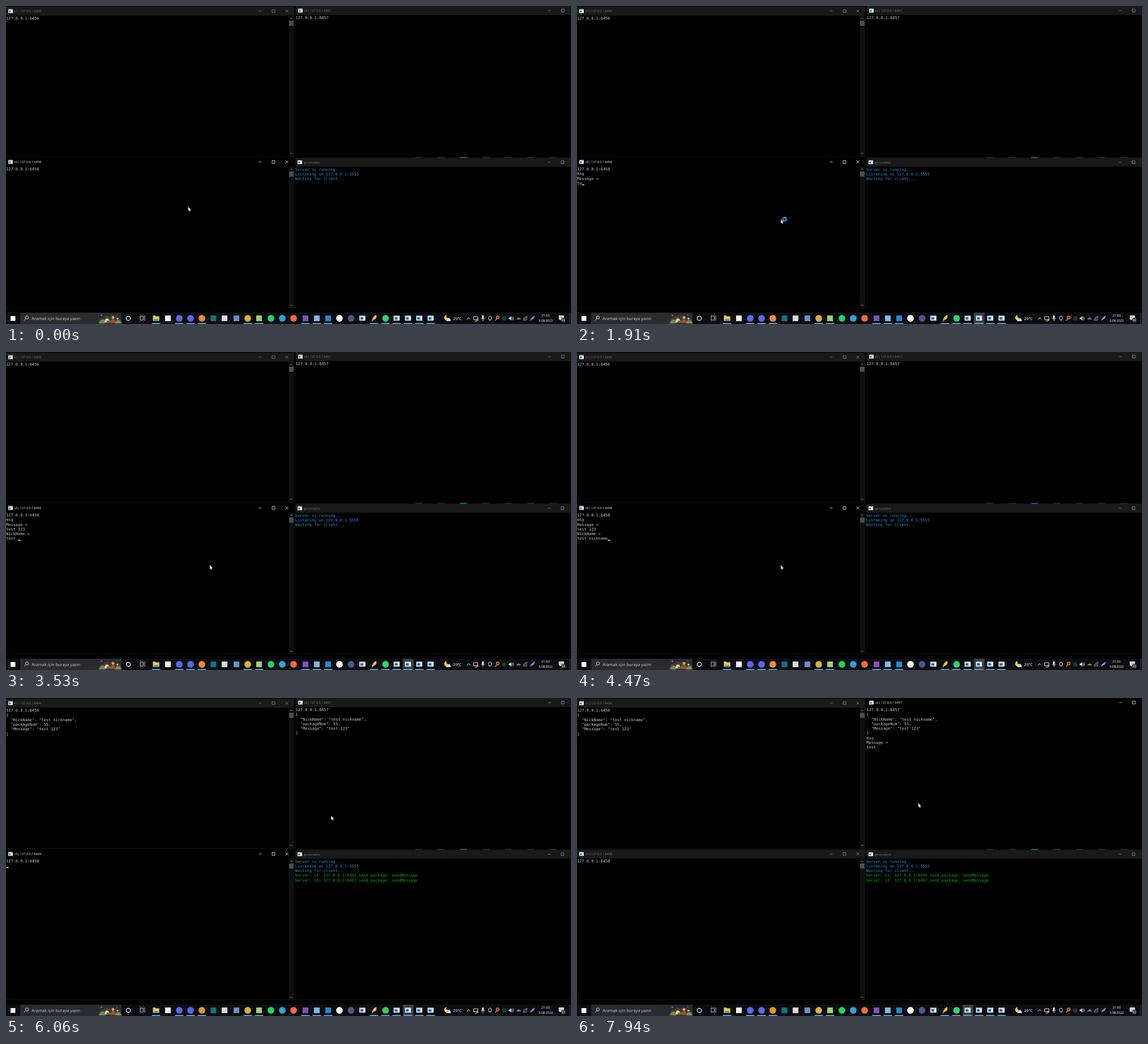
An HTML page that plays this animation: 998x561 px, repeating every 8000 ms.

```html
<!DOCTYPE html>
<html lang="tr">
<head>
<meta charset="utf-8">
<title>Terminals</title>
<style>
html, body { margin: 0; width: 100%; height: 100%; overflow: hidden; background: #000; }
svg { display: block; width: 100%; height: 100%; }
text { white-space: pre; text-rendering: geometricPrecision; }
.mono { font: 6.915px "DejaVu Sans Mono", "Liberation Mono", monospace; }
.ui { font-family: "Open Sans", "Noto Sans", sans-serif; fill: #fff; }
</style>
</head>
<body>
<svg id="stage" viewBox="0 0 998 561" preserveAspectRatio="none"></svg>
<script>
const LOOP = 8000, CHAR = 4.163, LINE = 8.31, SENT = 4680, SWITCH = 6300;
const stage = document.getElementById('stage');

function add(tag, attrs, parent = stage, text = '') {
  const el = document.createElementNS('http://www.w3.org/2000/svg', tag);
  for (const key in attrs) el.setAttribute(key, attrs[key]);
  el.textContent = text;
  parent.appendChild(el);
  return el;
}
const rect = (x, y, width, height, fill, parent) => add('rect', { x, y, width, height, fill }, parent);
const disc = (cx, cy, r, fill, parent) => add('circle', { cx, cy, r, fill }, parent);
const ring = (cx, cy, r, stroke, width, parent) =>
  add('circle', { cx, cy, r, stroke, fill: 'none', 'stroke-width': width }, parent);
const shape = (d, fill, parent) => add('path', { d, fill }, parent);
const line = (d, stroke, width = 1, parent) =>
  add('path', { d, stroke, fill: 'none', 'stroke-width': width }, parent);
const label = (x, y, text, size, parent) =>
  add('text', { x, y, class: 'ui', style: `font-size:${size}px` }, parent, text);
const show = (el, on) => el.setAttribute('visibility', on ? 'visible' : 'hidden');

function consoleIcon(x, y, w, h) {
  rect(x, y, w, h, '#e8eef0');
  rect(x, y, w, 1.2, '#9fb4bc');
  rect(x + w * .15, y + h * .36, w * .4, h * .42, '#2a7f86');
}

// Title bar; buttons is the centre of the minimise sign. Returns its painter.
function titleBar(x, y, w, title, buttons, hasClose) {
  const back = rect(x, y, w, 16, '#191919');
  const mid = y + 8;
  consoleIcon(x + 4, mid - 3.3, 8, 6.8);
  const name = label(x + 15, mid + 2.1, title, 5.45);
  let d = `M${buttons - 2.5} ${mid}h5M${buttons + 21} ${mid - 2.5}h5v5h-5z`;
  if (hasClose) d += `M${buttons + 44.5} ${mid - 2.5}l5 5m0 -5l-5 5`;
  const signs = line(d, '#fff', .75);
  return active => {
    back.setAttribute('fill', active ? '#000' : '#191919');
    name.style.fill = active ? '#fff' : '#808080';
    signs.setAttribute('stroke', active ? '#fff' : '#8a8a8a');
  };
}

function scrollbar(top, bottom) {
  rect(499.5, top, 8.5, bottom - top, '#101010');
  rect(500, top + 9, 7.8, 9, '#4d4d4d');
  line(`M502 ${top + 6}l1.8 -1.8l1.8 1.8M502 ${bottom - 6}l1.8 1.8l1.8 -1.8`, '#999', .9);
}

// Text area that accepts a string and optionally places a cursor after it.
function terminal(x, y) {
  const rows = [];
  const caret = rect(0, 0, CHAR + .2, 1.6, '#ddd');
  return (text, caretOn = false, color = () => '#ccc') => {
    const parts = text.split('\n');
    while (rows.length < parts.length)
      rows.push(add('text', { x, y: y + rows.length * LINE, class: 'mono' }));
    rows.forEach((row, i) => {
      const value = parts[i] || '';
      if (row.textContent !== value) row.textContent = value;
      row.style.fill = color(i);
    });
    const last = parts.length - 1;
    caret.setAttribute('x', x + parts[last].length * CHAR);
    caret.setAttribute('y', y + last * LINE - .2);
    show(caret, caretOn);
  };
}

// Windows
const paintTitle1 = titleBar(0, 1, 508, 's1| 127.0.0.1:6456', 449, true);
const paintTitle2 = titleBar(512, 0, 486, 's2| 127.0.0.1:6457', 960, false);
const paintTitle3 = titleBar(0, 267, 508, 's3| 127.0.0.1:6458', 449, true);
const paintTitle4 = titleBar(511, 267.5, 487, 'go-socketio', 959.5, false);
scrollbar(17, 265);
scrollbar(283, 533);
line('M0 265.5H508.5M508.5 0V533M511.5 0V533M0 532.5H998', '#131510', .8);
for (let i = 0; i < 7; i++)
  rect(723 + i * 39.5, 266.5, 12.5, 1.2, i === 2 ? '#2798c4' : '#2d4048');

const write1 = terminal(.2, 24), write2 = terminal(511.6, 22.9);
const write3 = terminal(.2, 289.9), write4 = terminal(510.8, 290.5);

// Taskbar
rect(0, 541, 998, 20, '#0b0d12');
rect(25, 541, 179, 20, '#292b30');
rect(8, 547, 8.5, 8.5, '#fff');
ring(37, 549.5, 2.7, '#ddd', .9);
line('M35 551.5l-3 3.2', '#ddd', .9);
label(45.3, 553.7, 'Aramak için buraya yazın', 7.4).style.fill = '#d0d0d0';

// Search illustration
shape('M163 560q1 -11 8 -10q4 -5 10 -2q7 -5 13 0q9 0 10 12z', '#37402a');
shape('M164 560q2 -7 7 -7q4 0 5 7z', '#6f8d4c');
shape('M192 560q2 -6 6 -6q5 0 6 6z', '#7a8f4f');
shape('M174 558q1 -7 4 -7q4 0 5 7z', '#e3d6c2');
shape('M185 559q1 -7 4 -7q4 0 5 7z', '#b0453a');
rect(178, 555, 11, 3.5, '#8a5a36');
disc(178.5, 549, 2.4, '#6b3426');
disc(189, 549.5, 2.4, '#d8a077');
disc(197, 551.5, 1.6, '#e8d9c0');
disc(168.5, 545.5, 1.3, '#c65be0');
disc(196, 545, .9, '#d05a60');

const focus = rect(701, 541, 19, 20, '#3a3e44');
ring(216, 551, 3.7, '#fff', 1.2);
line('M237 547h5.5v7h-5.5zM245 546v9M237 545v-.8M242.5 545v-.8M237 557v-.8M242.5 557v-.8', '#ddd', .9);
shape('M259.5 546h4l1.2 1.5h6v8h-11.2z', '#f4c64e');
rect(261.5, 552, 7.5, 3.6, '#3d9adb');

// Plain app marks: [centre, colour, square]
[
  [286, '#f2f2f2', 1], [306, '#5a68e8'], [326, '#5a68e8'], [346, '#ef8b32'],
  [366.5, '#0d7580', 1], [386, '#d5d9dc', 1], [407, '#6c8ec4', 1], [427, '#d8b13c'],
  [447, '#a5cc75', 1], [468, '#1ed760'], [488, '#2aa5dc'], [508, '#f76935'],
  [529, '#8052b9', 1], [549, '#86b7da', 1], [569, '#2489ca', 1], [589, '#f3f5f2'],
  [609.5, '#4e5688'], [670.5, '#2bd366']
].forEach(([x, color, square]) =>
  square ? rect(x - 5, 546, 10, 10, color) : disc(x, 551, 5.9, color));

shape('M646 556q1 -8 8 -11q2 5 -3 8z', '#e8c64c');
line('M646 557l4 -6', '#d9822b', .9);
[629.5, 690, 710, 730, 750].forEach(x => {
  rect(x - 5.3, 546.5, 10.6, 8.5, '#edf3f6');
  rect(x - 5.3, 546.5, 10.6, 1.5, '#b3cbd9');
  rect(x - 3.5, 549, 5, 4.3, '#1d67a8');
});
[265, 306, 326, 346, 427, 447, 529, 549, 569, 650, 670, 690, 710, 730, 750]
  .forEach(x => rect(x - 7.5, 559.3, 15, 1.7, '#68acd9'));

// Tray
disc(779, 550, 5, '#f3c64a');
disc(781.5, 547, 3.7, '#0b0d12');
shape('M778 556q-1 -3 2 -3q1 -2.5 3.5 -1.5q2.5 .5 2 4.5z', '#d7e0e8');
label(789.7, 553.5, '29°C', 6.9);
line('M814.5 552.5l2.8 -2.8l2.8 2.8', '#eee', 1);
line('M826 548h7.5v5.5h-7.5zM828 556h4', '#ddd', 1);
disc(832.5, 553.5, 2, '#e7953f');
rect(841, 546, 2.8, 6, '#eee');
line('M839.5 550q0 3.5 3 3.5q3 0 3 -3.5M842.5 553.5v2.5', '#ddd', .7);
line('M852.5 548h5v5h-5zM855 546v2M855 553v3', '#ccc', .9);
ring(868.5, 549.5, 2.4, '#ef7932', 1.5);
line('M867 551.5l-3 3.5', '#ef7932', 1.5);
disc(880, 551, 3.8, '#143f31');
shape('M888 549.5h2l2.5 -2.5v8l-2.5 -2.5h-2z', '#ddd');
line('M893.5 549q1.5 2 0 4M895 547.5q2.8 3.5 0 7', '#ddd', .8);
shape('M901.5 553q0 -2.5 2 -2.5q3 -2.5 4.5 .5q1.5 0 1.5 2z', '#777');
line('M914 555q0 -7 7 -7.5M916 555q0 -5 5 -5.5M918.3 555q0 -2.5 2.7 -3', '#bbb', .9);
shape('M926 556q0 -6 8 -10q0 6 -6.5 8z', '#a477d3');
label(945.8, 547.8, '21:03', 5.65);
label(940.5, 557.2, '3.08.2022', 5.65);
shape('M976.5 546h9v7h-5l-2 2v-2h-2z', '#f5f5f5');
line('M978 548.2h6M978 550.5h5', '#555', .7);
disc(984.5, 554, 3.9, '#383c40');
label(981.3, 556.1, '22', 5.6);
line('M996 541v20', '#55585d', .7);

// Mouse pointer with busy ring
const pointer = add('g', {});
shape('M0 0v7.2l1.6 -1.5l1.1 2.5l1.2 -.5l-1.1 -2.4h2.2z', '#fff', pointer);
const busy = add('g', {}, pointer);
ring(6.8, .2, 3, '#1c9be6', 2, busy);
const spark = line('M6.8 -2.8a3 3 0 0 1 3 3', '#4fbcf8', 2, busy);

// Keyboard input: [start, ms per key (0 prints at once), text]; \f clears
const input3 = [
  [880, 120, 'msg'], [1660, 0, '\nMessage >\n'], [1760, 100, 'test'], [2200, 150, ' 123'],
  [2950, 0, '\nNickName >\n'], [3150, 85, 'test '], [3650, 95, 'nickname'], [SENT, 0, '\f']
];
const input2 = [[6650, 90, 'msg'], [6950, 0, '\nMessage >\n'], [7120, 86, 'test']];

function typed(input, t, since) {
  let text = '';
  for (const [start, step, str] of input) {
    if (t < start) break;
    const count = step ? Math.min(str.length, Math.floor((t - start) / step) + 1) : str.length;
    text = str === '\f' ? '' : text + str.slice(0, count);
    since = start + (count - 1) * step;
  }
  return { text, blink: (t - since) % 1060 < 530 };
}

// Pointer stops: [time, x, y]
const path = [[0, 322, 354.5], [120, 322, 354.5], [700, 360, 376],
  [5550, 360, 376], [6200, 603, 185.5], [LOOP, 603, 185.5]];
function pointerAt(t) {
  const i = path.findIndex(p => p[0] > t);
  const [t0, x0, y0] = path[i - 1], [t1, x1, y1] = path[i];
  const u = (t - t0) / (t1 - t0), ease = u * u * (3 - 2 * u);
  return [x0 + (x1 - x0) * ease, y0 + (y1 - y0) * ease];
}

const packet = '\n{\n  "NickName": "test nickname",\n  "packageNum": 55,\n  "Message": "test 123"\n}';
const serverText = 'Server is running...\nListening on 127.0.0.1:5555\nWaiting for client...';
const serverLog = '\nServer: s1: 127.0.0.1:6456 send package: sendMessage' +
  '\nServer: s2: 127.0.0.1:6457 send package: sendMessage';

function render(t) {
  const sent = t >= SENT, second = t >= SWITCH;
  paintTitle1(false);
  paintTitle2(second);
  paintTitle3(!second);
  paintTitle4(false);

  const keys3 = typed(input3, t, -600), keys2 = typed(input2, t, SWITCH);
  write1('127.0.0.1:6456' + (sent ? packet : ''));
  write2('127.0.0.1:6457' + (sent ? packet : '') + (second ? '\n' + keys2.text : ''), second && keys2.blink);
  write3('127.0.0.1:6458\n' + keys3.text, !second && keys3.blink);
  write4(serverText + (sent ? serverLog : ''), false, i => i < 3 ? '#2f91cf' : '#13ad10');

  show(focus, t >= 60);
  focus.setAttribute('x', second ? 681 : 701);
  pointer.setAttribute('transform', `translate(${pointerAt(t)})`);
  show(busy, t >= 200 && t < 2900);
  spark.setAttribute('transform', `rotate(${t * .36} 6.8 .2)`);
}

const began = performance.now();
function tick() {
  render((performance.now() - began) % LOOP);
  requestAnimationFrame(tick);
}
tick();
</script>
</body>
</html>
```
